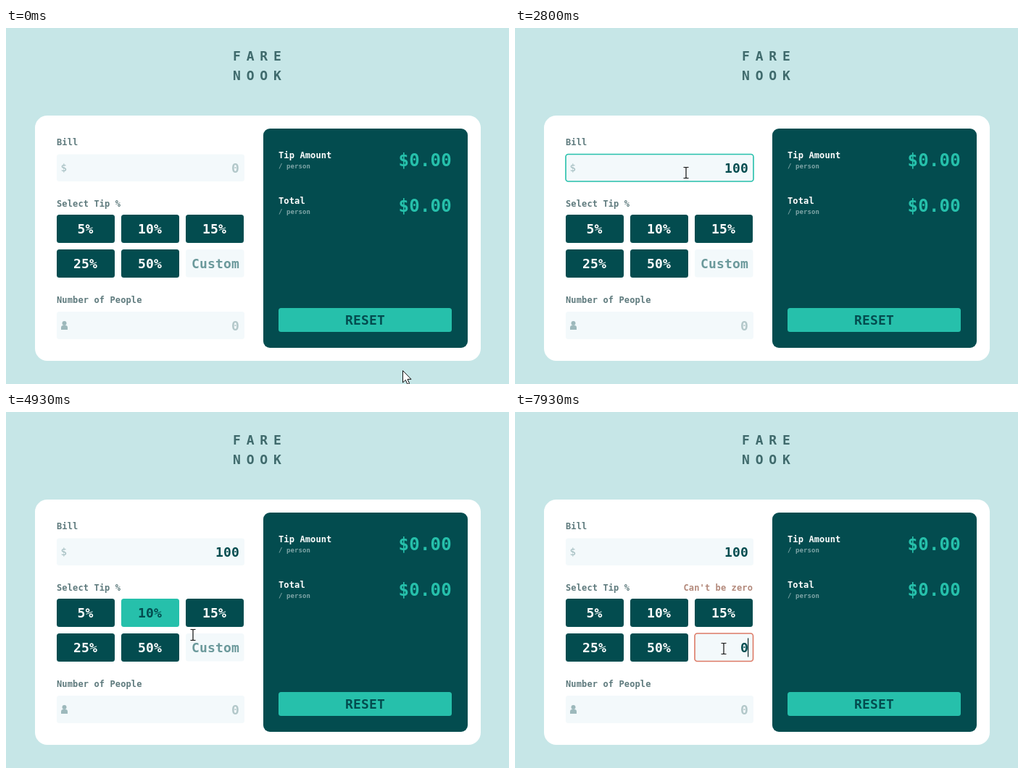
Write an HTML page that moves like this. It is 694 by 492 pixels and loops after 8000 ms.

```html
<!DOCTYPE html>
<html lang="en">
<head>
<meta charset="utf-8">
<title>Tip calculator</title>
<style>
html, body { margin: 0; width: 100%; height: 100%; overflow: hidden; background: #c6e6e7; }
svg { display: block; width: 694px; height: 492px; }
text { font: bold 18px "DejaVu Sans Mono", monospace; letter-spacing: .01em; white-space: pre; }
.logo { letter-spacing: 7.8px; fill: #3f6a6c; }
.label { font-size: 12px; fill: #5e7a7d; }
.white { fill: #fff; }
.per { font-size: 9px; fill: #7fa5a7; }
.sum { font-size: 24px; fill: #26c0ab; text-anchor: end; }
.mid { text-anchor: middle; }
.end { text-anchor: end; }
.field { fill: #f3f9fb; stroke: none; stroke-width: 1.6; }
.field.focus { stroke: #26c0ab; }
.field.bad { stroke: #dd7a66; }
.value { fill: #034c4f; text-anchor: end; }
.hint { fill: #b3c8ca; }
.hint.custom { fill: #6b999b; }
.icon { fill: #9db9bc; }
.btn rect { fill: #034c4f; }
.btn text { fill: #fff; text-anchor: middle; }
.btn.on rect, .reset rect { fill: #26c0ab; }
.btn.hover rect, .reset.hover rect { fill: #a2e8df; }
.btn.on text, .btn.hover text, .reset text { fill: #034c4f; }
.error { font-size: 12px; fill: #b3897b; text-anchor: end; }
.caret { fill: #06282a; }
</style>
</head>
<body>
<svg viewBox="0 0 694 492">
  <text class="logo" x="313" y="45">FARE</text>
  <text class="logo" x="313" y="72">NOOK</text>
  <rect x="40" y="121" width="615" height="339" rx="17" fill="#fff"/>

  <text class="label" x="70" y="162">Bill</text>
  <rect class="field" id="bill" x="70" y="174.5" width="259" height="37.5" rx="3.5"/>
  <text class="icon" x="75.500" y="198" style="font-size:14px;font-weight:normal">$</text>
  <text class="value" id="billText" x="322" y="200"></text>

  <text class="label" x="70" y="247">Select Tip %</text>
  <text class="error" id="error" x="328" y="247">Can't be zero</text>
  <g id="buttons"></g>
  <rect class="field" id="custom" x="248" y="306" width="80.500" height="38.500" rx="3.5"/>
  <text class="value" id="customText" x="322" y="332"></text>

  <text class="label" x="70" y="380">Number of People</text>
  <rect class="field" x="70" y="392" width="259" height="38" rx="3.5"/>
  <g class="icon">
    <circle cx="80.500" cy="408" r="3"/>
    <path d="M76 417v-3q0-3 3-3h3q3 0 3 3v3z"/>
  </g>
  <text class="value hint" x="322" y="418">0</text>

  <rect x="355" y="139" width="282" height="303" rx="9" fill="#034c4f"/>
  <text class="label white" x="376" y="180">Tip Amount</text>
  <text class="per" x="376" y="194">/ person</text>
  <text class="sum" x="615" y="191">$0.00</text>
  <text class="label white" x="376" y="243">Total</text>
  <text class="per" x="376" y="257">/ person</text>
  <text class="sum" x="615" y="254">$0.00</text>
  <g class="reset" id="reset">
    <rect x="376" y="387" width="239" height="33" rx="3.5"/>
    <text class="mid" x="495.500" y="410">RESET</text>
  </g>

  <rect class="caret" id="caret" x="321" width="1.2" height="26"/>
  <g id="cursor">
    <path id="arrow" d="M.5.5V17l3.800-3.600 2.700 6 2.600-1.200-2.600-5.800h5z" fill="#fff" stroke="#111"/>
    <path id="beam" d="M-3.500-7.500h2.500q1 0 1 1 0-1 1-1h2.500M0-7V7M-3.500 7.500h2.500q1 0 1-1 0 1 1 1h2.500" fill="none" stroke="#111" stroke-width="1.2"/>
    <path id="hand" d="M-1.500 2Q-1.500 .5 0 .5T1.500 2V8q2.500-1.200 3 .6 2-.8 2.600.8 2.700-.7 2.700 1.800v4.300q0 2-1.500 4V22.500H-.8V20.500L-5.500 14q-2-2.700-.5-3.500 1.500-.7 3 1.200l1.500 1.600zM1.500 8v4M4.500 9v3.500M7.100 10v3" fill="#fff" stroke="#111"/>
  </g>
</svg>
<script>
const LOOP = 8000;
const $ = id => document.getElementById(id);

// Pointer moves: start, end, from, to
const moves = [
  [30, 665, [547, 473], [232, 191]],
  [680, 860, [232, 191], [234, 191]],
  [2670, 3470, [234, 191], [261, 318]],
  [3760, 4330, [261, 318], [226, 287.5]],
  [4580, 5270, [226, 287.5], [288, 327]]
];
const billFocus = 860, typed = [1790, 2000, 2260], pick = 4360;
const customFocus = 5335, zeroTyped = 6660;

const buttons = ["5%", "10%", "15%", "25%", "50%"].map((label, i) => {
  const x = 70 + i % 3 * 89, y = i < 3 ? 258 : 306;
  $("buttons").insertAdjacentHTML("beforeend",
    `<g class="btn"><rect x="${x}" y="${y}" width="80" height="39" rx="3.500"/>` +
    `<text x="${x + 39.5}" y="${y + 26}">${label}</text></g>`);
  return { el: $("buttons").lastChild, box: [x, y, 80, 39] };
});
buttons.push({ el: $("reset"), box: [376, 387, 239, 33] });
const fields = [[70, 174, 259, 38], [248, 306, 81, 39], [70, 392, 259, 38]];

const ease = p => p * p * (3 - 2 * p);
const inside = ([x, y], [l, t, w, h]) => x >= l && x < l + w && y >= t && y < t + h;
const show = (id, on) => { $(id).style.display = on ? "" : "none"; };

function pointer(t) {
  let pos = moves[0][2];
  for (const [start, end, a, b] of moves) {
    if (t < start) break;
    const k = ease(Math.min(1, (t - start) / (end - start)));
    pos = a.map((v, i) => v + (b[i] - v) * k);
  }
  return pos;
}

function draw(t) {
  const pos = pointer(t);
  let kind = fields.some(f => inside(pos, f)) ? "beam" : "arrow";
  buttons.forEach(({ el, box }, i) => {
    const hover = inside(pos, box);
    if (hover) kind = "hand";
    el.classList.toggle("hover", hover);
    if (i === 1) el.classList.toggle("on", t >= pick && t < zeroTyped);
  });
  for (const k of ["arrow", "beam", "hand"]) show(k, k === kind);
  $("cursor").setAttribute("transform", `translate(${pos.map(Math.round)})`);

  const digits = typed.filter(s => t >= s).length;
  const zero = t >= zeroTyped;
  const inBill = t >= billFocus && t < pick, inCustom = t >= customFocus;
  $("billText").textContent = digits ? "100".slice(0, digits) : "0";
  $("billText").classList.toggle("hint", !digits);
  $("customText").textContent = zero ? "0" : "Custom";
  $("customText").setAttribute("class", zero ? "value" : "value hint custom");
  $("bill").classList.toggle("focus", inBill);
  $("custom").classList.toggle("focus", inCustom);
  $("custom").classList.toggle("bad", zero);
  show("error", zero);

  // The caret restarts its blink at every click or key
  const last = Math.max(...[billFocus, ...typed, customFocus, zeroTyped].filter(s => t >= s));
  show("caret", (inBill || inCustom) && (t - last) % 1000 < 500);
  $("caret").setAttribute("y", inBill ? 180.5 : 312.5);
}

let begin;
function tick(now) {
  begin ??= now;
  draw((now - begin) % LOOP);
  requestAnimationFrame(tick);
}
draw(0);
requestAnimationFrame(tick);
</script>
</body>
</html>
```
